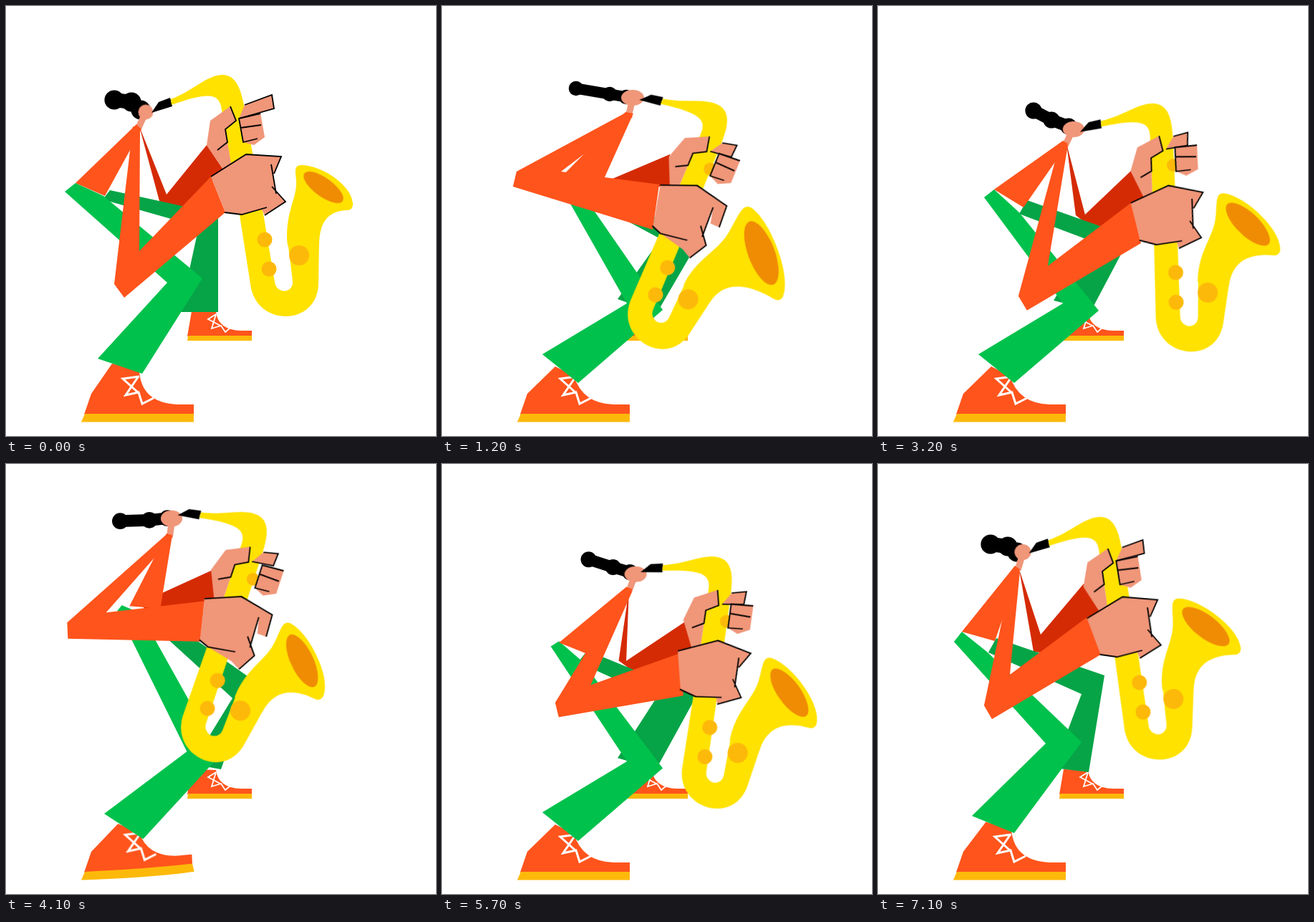
An HTML page without scripts that plays this animation: 600x600 px, repeating every 7.2 s.

```html
<!DOCTYPE html>
<html lang="en">
<head>
<meta charset="utf-8">
<title>Saxophone player</title>
<style>
:root {
  --orange: #ff541c; --red: #d52b04; --green: #00c14c; --pine: #06a447;
  --yellow: #ffe200; --amber: #fdb90a; --skin: #f09679;
  --fall: linear(0 0% 25%, .12 25% 50%, .44 50% 75%, .78 75% 100%);
}
html, body { margin: 0; height: 100%; overflow: hidden; background: #fff; }
svg { display: block; width: 100%; height: 100%; }
.move { animation: 2.4s steps(2) infinite; }
.ink { fill: none; stroke: #000; stroke-width: 1.8; }
.lace { fill: none; stroke: #fff; }
.skin { fill: var(--skin); }

#sax { animation-name: sax; transform-origin: 388.5px 386px; }
#bell { animation-name: bell; fill: var(--yellow); }
#mouthOfBell { animation-name: mouthOfBell; fill: #f08c04; }
#index { animation-name: index; }
#fingers { animation-name: fingers; }
#hand { animation-name: hand; }
#handLines { animation-name: handLines; }
#head { animation-name: head; }
#gasp { animation-name: gasp; }
#hair { animation-name: hair; fill: none; stroke: #000; marker: url(#curl); }
#neck { animation-name: neck; stroke: var(--skin); stroke-width: 9; }
#torso { animation-name: torso; fill: var(--orange); }
#arm { animation-name: arm; fill: var(--orange); }
#backArm { animation-name: backArm; fill: var(--red); }
#leg { animation-name: leg; fill: var(--green); }
#backLeg { animation-name: backLeg; fill: var(--pine); }
#shoe { animation-name: shoe; fill: var(--orange); }
#sole { animation-name: sole; fill: var(--amber); }
#laces { animation-name: laces; }

@keyframes sax {
  0%, 100% { transform: none; }
  8.33% { transform: translate(12.5px, -44px) rotate(1.3deg); }
  16.66% { transform: translate(11.5px, -95px) rotate(0deg); animation-timing-function: var(--fall); }
  33.33% { transform: translate(46.5px, 49px) rotate(7.5deg); animation-timing-function: var(--fall); }
  50% { transform: translate(-82.5px, 44.5px) rotate(32.2deg); }
  58.33% { transform: translate(-130.5px, 36px) rotate(36deg); }
  66.66% { transform: translate(-124.5px, 3px) rotate(35.3deg); animation-timing-function: steps(3); }
  79.16% { transform: translate(-43.5px, -60px) rotate(14deg); animation-timing-function: steps(3); }
  91.66% { transform: translate(2.5px, -35.5px) rotate(2.5deg); animation-timing-function: steps(1); }
  95.83% { transform: translate(2.5px, -20.5px) rotate(1.2deg); animation-timing-function: steps(1); }
}
@keyframes bell {
  0%, 16.66%, 79.16%, 100% { d: path("M393 335 C388 290 406 270 405 245 C405 235 400 222 412 222 C440 222 483 250 484 276 Q484 286 474 285 C450 287 437 300 437 335Z"); }
  50%, 91.66% { d: path("M393 335 C388 295 408 270 407 240 C407 215 400 193 416 193 C450 195 515 245 519 275 Q519 284 508 284 C470 285 437 298 437 335Z"); }
  16.66% { animation-timing-function: steps(8); }
  50% { animation-timing-function: steps(7); }
  79.16% { animation-timing-function: steps(3); }
}
@keyframes mouthOfBell {
  0%, 16.66%, 79.16%, 100% { transform: translate(443px, 253px) rotate(36deg) scale(1); }
  50%, 91.66% { transform: translate(461px, 239px) rotate(37deg) scale(1.43); }
  16.66% { animation-timing-function: steps(8); }
  50% { animation-timing-function: steps(7); }
  79.16% { animation-timing-function: steps(3); }
}
@keyframes index {
  0%, 16.66%, 100% { d: path("M333 138 L371 124 374 143 325 157"); }
  33.33%, 91.66% { d: path("M333 138 L352 130 354 148 325 157"); }
  16.66% { animation-timing-function: var(--fall); }
}
@keyframes fingers {
  0%, 16.66%, 91.66%, 100% { transform: none; }
  33.33%, 50% { transform: translate(12px, -4px); }
  66.66% { transform: translate(18px, -3px); animation-timing-function: steps(6); }
  16.66% { animation-timing-function: var(--fall); }
  50% { animation-timing-function: steps(4); }
}
@keyframes hand {
  0%, 33.33%, 91.66%, 100% { d: path("M286 238 L335 207 384 210 374 234 372 236 371 221 376 261 371 252 390 273 361 292 357 284 329 291 306 288Z"); }
  50%, 66.66% { d: path("M291 234 L335 207 385 209 392 240 379 242 370 221 379 264 369 252 390 271 380 298 365 293 327 291 313 288Z"); }
  33.33% { animation-timing-function: var(--fall); }
  66.66% { animation-timing-function: steps(6); }
}
@keyframes handLines {
  0%, 33.33%, 91.66%, 100% { d: path("M286 238 L335 207 384 210 374 234 M370 221 L377 262 M371 252 L390 273 361 292 M305 288 L329 291 364 281"); }
  50%, 66.66% { d: path("M291 234 L335 207 385 209 392 240 M370 221 L379 264 M369 252 L390 271 380 298 M312 288 L327 291 364 279"); }
  33.33% { animation-timing-function: var(--fall); }
  66.66% { animation-timing-function: steps(6); }
}
@keyframes head {
  0%, 100% { transform: translate(195px, 148px) scale(.95, .95); }
  8.33% { transform: translate(181px, 105px) scale(.92, 1); }
  16.66% { transform: translate(166px, 64px) scale(.92, 1); animation-timing-function: var(--fall); }
  33.33% { transform: translate(273px, 172px) scale(1.38, 1); animation-timing-function: var(--fall); }
  50% { transform: translate(266px, 128px) scale(1.45, 1); }
  58.33% { transform: translate(233px, 118px) scale(1.42, 1); }
  66.66% { transform: translate(241px, 88px) scale(1.38, 1.05); animation-timing-function: steps(3); }
  79.16% { transform: translate(211px, 52px) scale(1.35, 1); animation-timing-function: steps(3); }
  91.66% { transform: translate(207px, 105px) scale(1.27, 1); animation-timing-function: steps(1); }
  95.83% { transform: translate(202px, 123px) scale(1.05, 1); animation-timing-function: steps(1); }
}
@keyframes gasp {
  0%, 25%, 100% { opacity: 0; animation-timing-function: step-end; }
  4.16% { opacity: 1; animation-timing-function: step-end; }
}
@keyframes hair {
  0%, 100% { d: path("M151 131 L175 134 188 145"); stroke-width: 20px; }
  8.33% { d: path("M135 96 L159 99 176 104"); stroke-width: 20px; }
  16.66% { d: path("M117 50 L143 57 161 63"); stroke-width: 20px; animation-timing-function: var(--fall); }
  33.33% { d: path("M217 146 L242 159 266 168"); stroke-width: 17px; animation-timing-function: var(--fall); }
  50% { d: path("M187 115 L234 123 257 127"); stroke-width: 15px; }
  58.33% { d: path("M156 117 L201 119 225 118"); stroke-width: 15px; }
  66.66% { d: path("M165 93 L209 91 236 88"); stroke-width: 16px; animation-timing-function: steps(3); }
  79.16% { d: path("M148 53 L182 53 204 51"); stroke-width: 18px; animation-timing-function: steps(3); }
  91.66% { d: path("M160 99 L185 102 200 104"); stroke-width: 20px; animation-timing-function: steps(1); }
  95.83% { d: path("M157 112 L181 115 194 123"); stroke-width: 20px; animation-timing-function: steps(1); }
}
@keyframes neck {
  0%, 100% { d: path("M194 150 L184 172"); }
  8.33% { d: path("M182 106 L174 131"); }
  16.66% { d: path("M167 65 L159 92"); animation-timing-function: var(--fall); }
  33.33% { d: path("M271 174 L261 195"); animation-timing-function: var(--fall); }
  50% { d: path("M266 130 L260 154"); }
  58.33% { d: path("M235 120 L232 140"); }
  66.66% { d: path("M242 90 L240 114"); animation-timing-function: steps(3); }
  79.16% { d: path("M211 53 L205 80"); animation-timing-function: steps(3); }
  91.66% { d: path("M207 108 L202 132"); animation-timing-function: steps(1); }
  95.83% { d: path("M202 125 L195 148"); animation-timing-function: steps(1); }
}
@keyframes torso {
  0%, 100% { d: path("M182 165 L189 172 138 265 97 247Z"); }
  8.33% { d: path("M170 125 L180 133 143 231 98 218Z"); }
  16.66% { d: path("M155 86 L164 92 130 195 85 180Z"); animation-timing-function: var(--fall); }
  33.33% { d: path("M258 188 L265 192 203 281 162 256Z"); animation-timing-function: var(--fall); }
  50% { d: path("M256 148 L267 150 222 250 165 240Z"); }
  58.33% { d: path("M228 136 L237 138 208 238 160 230Z"); }
  66.66% { d: path("M236 108 L244 110 233 210 186 210Z"); animation-timing-function: steps(3); }
  79.16% { d: path("M200 75 L208 78 180 185 145 175Z"); animation-timing-function: steps(3); }
  91.66% { d: path("M200 125 L206 130 164 230 133 223Z"); animation-timing-function: steps(1); }
  95.83% { d: path("M191 142 L198 147 163 247 117 234Z"); animation-timing-function: steps(1); }
}
@keyframes arm {
  0%, 100% { d: path("M177 168 L187 172 186 342 286 238 306 288 165 407 151 388Z"); }
  8.33% { d: path("M166 130 L178 132 202 301 303 190 322 243 191 366 174 351Z"); }
  16.66% { d: path("M152 90 L164 92 212 265 301 142 322 194 204 330 186 315Z"); animation-timing-function: var(--fall); }
  33.33% { d: path("M254 191 L265 194 237 363 354 274 367 331 208 425 196 405Z"); animation-timing-function: var(--fall); }
  50% { d: path("M258 148 L266 155 166 231 303 249 294 312 99 252 104 231Z"); }
  58.33% { d: path("M230 136 L236 142 118 225 258 241 248 301 54 248 57 226Z"); }
  66.66% { d: path("M238 107 L243 115 132 206 275 208 262 266 72 237 74 214Z"); animation-timing-function: steps(3); }
  79.16% { d: path("M200 77 L208 80 155 210 281 158 289 211 115 257 108 236Z"); animation-timing-function: steps(3); }
  91.66% { d: path("M196 132 L206 132 179 271 300 192 319 253 149 324 139 305Z"); animation-timing-function: steps(1); }
  95.83% { d: path("M188 147 L198 150 184 294 294 212 314 264 159 356 148 337Z"); animation-timing-function: steps(1); }
}
@keyframes backArm {
  0%, 100% { d: path("M186 168 L224 263 280 194 303 228 240 288 214 272Z"); }
  8.33% { d: path("M176 130 L228 214 298 147 320 182 244 239 222 234Z"); }
  16.66% { d: path("M161 88 L232 174 292 99 314 133 250 196 226 193Z"); animation-timing-function: var(--fall); }
  33.33% { d: path("M263 192 L289 291 353 230 373 265 304 314 276 292Z"); animation-timing-function: var(--fall); }
  50% { d: path("M258 152 L212 252 318 207 320 250 225 262 205 250Z"); }
  58.33% { d: path("M230 140 L196 226 266 197 268 240 178 240 172 230Z"); }
  66.66% { d: path("M238 113 L205 189 289 165 290 208 184 208 178 201Z"); animation-timing-function: steps(3); }
  79.16% { d: path("M205 77 L222 172 286 114 300 152 222 200 212 190Z"); animation-timing-function: steps(3); }
  91.66% { d: path("M204 130 L230 220 291 149 313 187 236 248 218 246Z"); animation-timing-function: steps(1); }
  95.83% { d: path("M197 147 L227 238 287 167 310 205 236 264 217 262Z"); animation-timing-function: steps(1); }
}
@keyframes leg {
  0%, 100% { d: path("M97 247 L82 259 225 386 128 492 190 513 274 380 136 265Z"); }
  8.33% { d: path("M98 218 L87 233 220 377 128 495 191 512 266 372 135 245Z"); }
  16.66% { d: path("M85 180 L72 195 205 360 128 500 190 510 250 352 122 208Z"); animation-timing-function: var(--fall); }
  33.33% { d: path("M162 256 L148 267 258 415 140 486 190 526 308 425 197 288Z"); animation-timing-function: var(--fall); }
  50% { d: path("M165 235 L157 237 258 415 140 486 190 526 308 424 191 255Z"); }
  58.33% { d: path("M160 225 L152 228 258 412 140 487 191 526 307 421 184 235Z"); }
  66.66% { d: path("M170 208 L166 212 261 408 139 487 192 526 305 418 196 212Z"); animation-timing-function: steps(3); }
  79.16% { d: path("M145 175 L134 190 235 388 133 490 190 518 285 385 170 200Z"); animation-timing-function: steps(3); }
  91.66% { d: path("M133 223 L123 239 241 393 132 488 190 517 289 395 161 242Z"); animation-timing-function: steps(1); }
  95.83% { d: path("M117 234 L106 248 234 390 131 491 190 515 284 388 152 262Z"); animation-timing-function: steps(1); }
}
@keyframes backLeg {
  0%, 100% { d: path("M145 257 L296 290 296 427 243 427 269 308 135 270Z"); }
  8.33% { d: path("M145 230 L295 290 296 427 243 427 268 318 136 245Z"); }
  16.66% { d: path("M135 195 L285 270 296 427 243 427 258 300 122 208Z"); animation-timing-function: var(--fall); }
  33.33% { d: path("M208 271 L352 322 298 424 245 411 295 327 197 290Z"); animation-timing-function: var(--fall); }
  50% { d: path("M195 245 L360 325 300 428 245 409 305 325 180 258Z"); }
  58.33% { d: path("M196 230 L355 320 300 427 256 414 314 330 182 240Z"); }
  66.66% { d: path("M210 208 L348 310 302 425 268 418 325 337 192 210Z"); animation-timing-function: steps(3); }
  79.16% { d: path("M182 184 L335 282 296 428 243 420 298 306 170 200Z"); animation-timing-function: steps(3); }
  91.66% { d: path("M187 234 L329 301 293 432 246 420 294 322 166 253Z"); animation-timing-function: steps(1); }
  95.83% { d: path("M165 243 L316 295 294 430 245 424 284 321 154 263Z"); animation-timing-function: steps(1); }
}
@keyframes shoe {
  0%, 12.5%, 100% { d: path("M148 499 L119 541 109 570 Q190 570 262 570 L262 556 240 556 Q188 554 186 508Z"); }
  20.83% { d: path("M150 500 L119 541 109 570 Q200 564 259 553 L258 539 236 542 Q192 544 187 508Z"); animation-timing-function: steps(3); }
  33.33%, 58.33% { d: path("M158 503 L119 541 109 570 Q190 570 262 570 L262 556 240 556 Q196 555 184 516Z"); }
  66.66% { d: path("M158 503 L119 541 109 570 Q200 564 259 553 L258 539 236 542 Q200 544 186 516Z"); animation-timing-function: steps(3); }
  79.16%, 91.66% { d: path("M153 500 L119 541 109 570 Q190 570 262 570 L262 556 240 556 Q190 554 186 510Z"); }
}
@keyframes sole {
  0%, 12.5%, 33.33%, 58.33%, 79.16%, 100% { d: path("M110 569 Q190 569 262 569 L262 580.5 Q190 580.5 105 580.5Z"); }
  20.83%, 66.66% { d: path("M110 569 Q200 563 259 552 L263 563 Q200 576 105 580.5Z"); animation-timing-function: steps(3); }
}
@keyframes laces {
  0%, 12.5%, 79.16%, 100% { transform: none; }
  33.33%, 58.33% { transform: translate(2px, 0); }
  20.83%, 66.66% { transform: translate(5px, -4px); animation-timing-function: steps(3); }
}
</style>
</head>
<body>
<svg viewBox="0 0 600 600">
  <defs>
    <marker id="curl" overflow="visible"><circle r=".68"/></marker>
  </defs>

  <g>
    <path fill="#ff541c" d="M259 426 L253 461 H343 V453 H328 Q296 452 293 427Z"/>
    <path fill="#fdb90a" d="M254 460 H343 V467 H253Z"/>
    <path class="lace" stroke-width="1.8" d="M293 430 L282 437 301 447 M293 430 L287 450 300 446 306 455 313 449"/>
  </g>
  <path id="shoe" class="move"/>
  <path id="sole" class="move"/>
  <path id="laces" class="move lace" stroke-width="3" d="M186 517 L163 520 184 539 M184 518 L167 543 185 539 190 555 206 547"/>

  <path id="backArm" class="move"/>
  <path id="backLeg" class="move"/>
  <path id="leg" class="move"/>
  <path id="hair" class="move"/>
  <path id="neck" class="move"/>
  <g id="head" class="move">
    <circle class="skin" r="11"/>
    <ellipse id="gasp" class="move" cx="1" cy="2" rx="1.5" ry="2.6"/>
  </g>
  <path id="torso" class="move"/>
  <path id="arm" class="move"/>

  <g id="sax" class="move">
    <path d="M203 149 L213 134 229 128 232 140Z"/>
    <path fill="#ffe200" d="M230 130 C262 118 280 96 303 96 C322 97 328 118 332 138 L358 284 375 385 C377 402 401 402 400 384 L392 320 H437 L436 388 C434 448 348 448 341 388 L326 292 301 145 C298 122 285 119 231 138Z"/>
    <path id="bell" class="move"/>
    <ellipse id="mouthOfBell" class="move" rx="33" ry="13"/>
    <g fill="#fdb90a">
      <circle cx="361" cy="326" r="10.5"/>
      <circle cx="367" cy="367" r="10.5"/>
      <circle cx="409" cy="348" r="14"/>
      <circle cx="338" cy="178" r="9"/>
    </g>

    <path class="skin" d="M280 194 L285 160 313 140 321 160 306 172 309 190 314 220 303 228Z"/>
    <path class="ink" d="M313 140 L321 160 306 172 309 190 295 201"/>
    <path id="index" class="move skin" stroke="#000" stroke-width="1.8"/>
    <g id="fingers" class="move">
      <path class="skin" d="M325 157 L355 149 361 183 346 194 331 190Z"/>
      <path class="ink" d="M355 150 L325 157 331 190 351 185 M327 170 L356 166"/>
    </g>

    <path id="hand" class="move skin"/>
    <path id="handLines" class="move ink"/>
  </g>
</svg>
</body>
</html>
```
